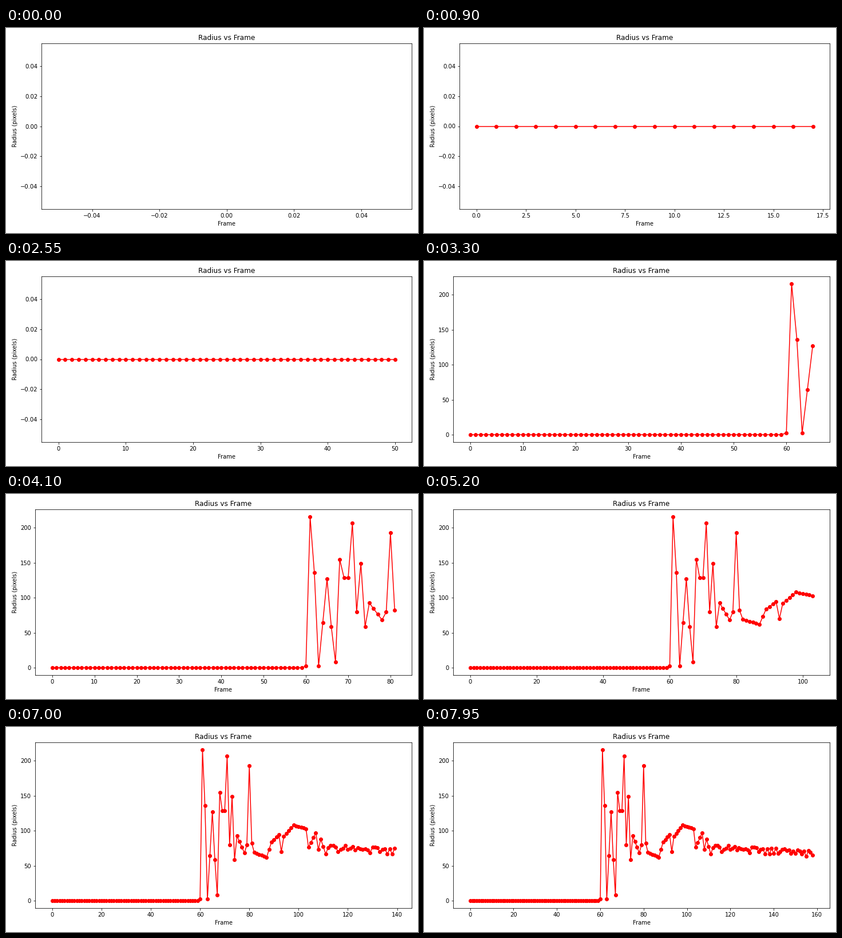
A matplotlib script for the animation above (8000 ms loop, 720 px wide and 360 px high).

```python
import matplotlib.pyplot as plt
import numpy as np
from matplotlib.animation import FuncAnimation

STEPS = 160
INTERVAL = 50
START, SETTLED = 59, 112

# Turning points (sample, radius): flat, wild swings, slow rise, decline.
KEYS = [
    (START, 0), (60, 2.3), (61, 215.8), (62, 136), (63, 2.3), (65, 127),
    (66, 59), (67, 8), (68, 155), (69, 129), (70, 129), (71, 206.5),
    (72, 80), (73, 149), (74, 58.5), (75, 92.5), (78, 68.3), (79, 79.6),
    (80, 192.7), (81, 82), (82, 69), (87, 62), (89, 84), (92, 94.3),
    (93, 70), (94, 92), (98, 108), (103, 103), (104, 76.4), (107, 97),
    (108, 73), (109, 88), (111, 66.7), (SETTLED, 76), (STEPS, 66.5),
]


def make_radius(index):
    radius = np.interp(index, *zip(*KEYS))
    jitter = np.random.default_rng(4).uniform(-5, 5, len(index))
    return radius + np.where(index > SETTLED, jitter, 0)


index = np.arange(STEPS)
radius = make_radius(index)

fig, ax = plt.subplots(figsize=(10, 5), dpi=72)
line, = ax.plot([], [], "ro-")
ax.set_title("Radius vs Frame")
ax.set_xlabel("Frame")
ax.set_ylabel("Radius (pixels)")


def reset():
    line.set_data([], [])
    fig.subplots_adjust(left=0.125, right=0.9, bottom=0.11, top=0.88)
    return line,


def update(n):
    line.set_data(index[:n], radius[:n])
    ax.relim()
    ax.autoscale_view()
    fig.tight_layout()
    return line,


anim = FuncAnimation(fig, update, frames=STEPS, init_func=reset,
                     interval=INTERVAL, repeat=True, repeat_delay=0)
plt.show()
```
